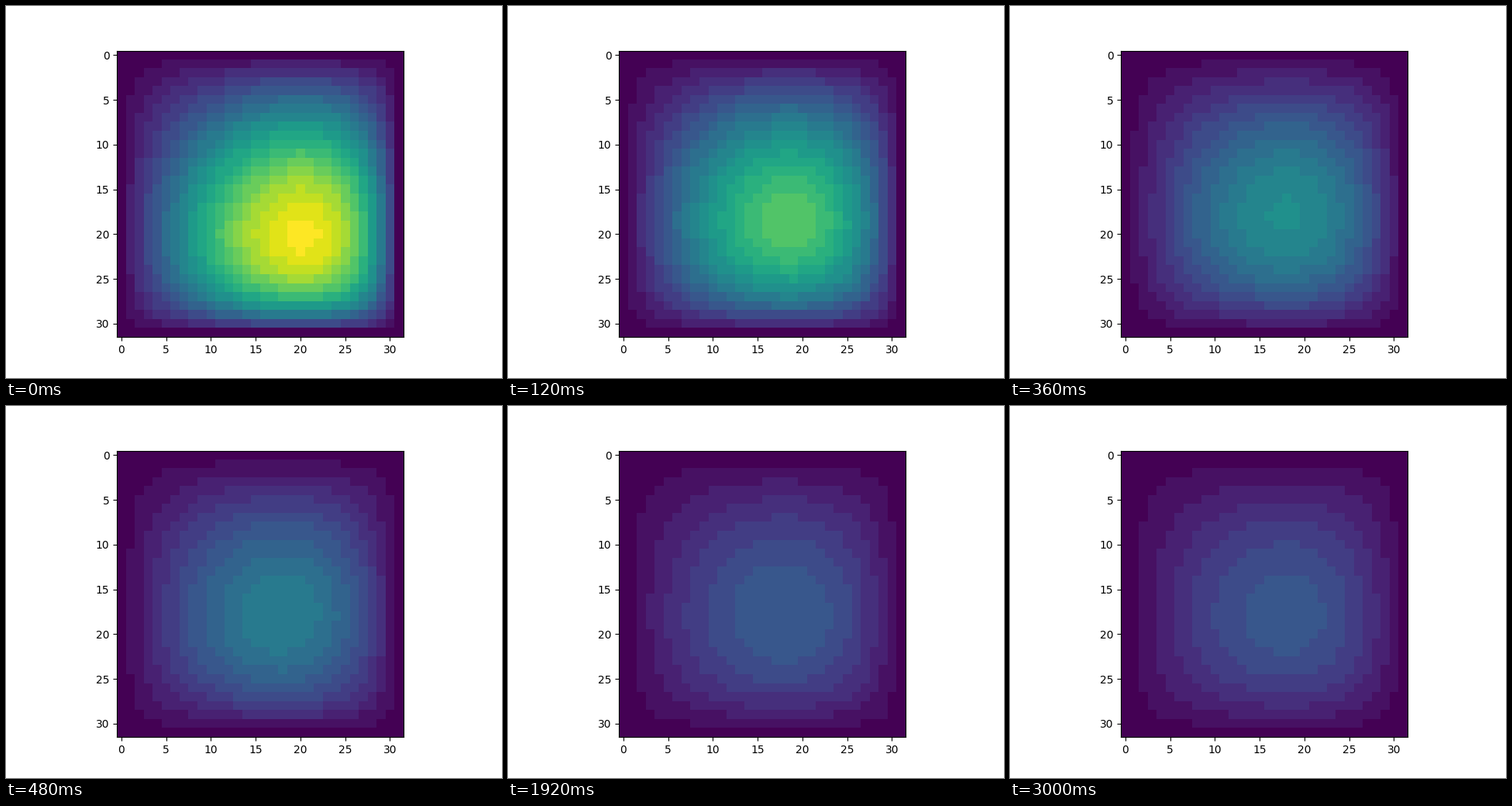
Animation, 640 px wide and 480 px high, one loop 3840 ms. Source, as a matplotlib script:

```python
import numpy as np
import matplotlib.pyplot as plt
from matplotlib.animation import FuncAnimation

SIZE = 32
FRAMES = 32
INTERVAL = 120
BANDS = 22  # flat colour steps on the 0..1 scale


def profile(power, soften=1):
    """Skewed hump t - t**power over one side, scaled to a peak of 1."""
    t = np.linspace(0, 1, SIZE)
    hump = t - t ** power
    return (hump / hump.max()) ** soften


START = profile(4.5, soften=.9)
SETTLED = profile(3)


def height(n):
    """Quick cooling followed by a slow drift to the steady level."""
    return .25 + .1 * np.exp(-n / 21) + .65 * .62 ** n


def field(n):
    mix = .3 ** n
    line = mix * START + (1 - mix) * SETTLED
    heat = height(n) * np.outer(line, line)
    return np.floor(heat * BANDS + .4) / BANDS


fig, ax = plt.subplots(figsize=(6.4, 4.8), dpi=100)
image = ax.imshow(field(0), cmap="viridis", vmin=0, vmax=1,
                  interpolation="nearest")


def update(n):
    image.set_data(field(n))
    return [image]


anim = FuncAnimation(fig, update, frames=FRAMES, interval=INTERVAL,
                     repeat=True, repeat_delay=0)
plt.show()
```
